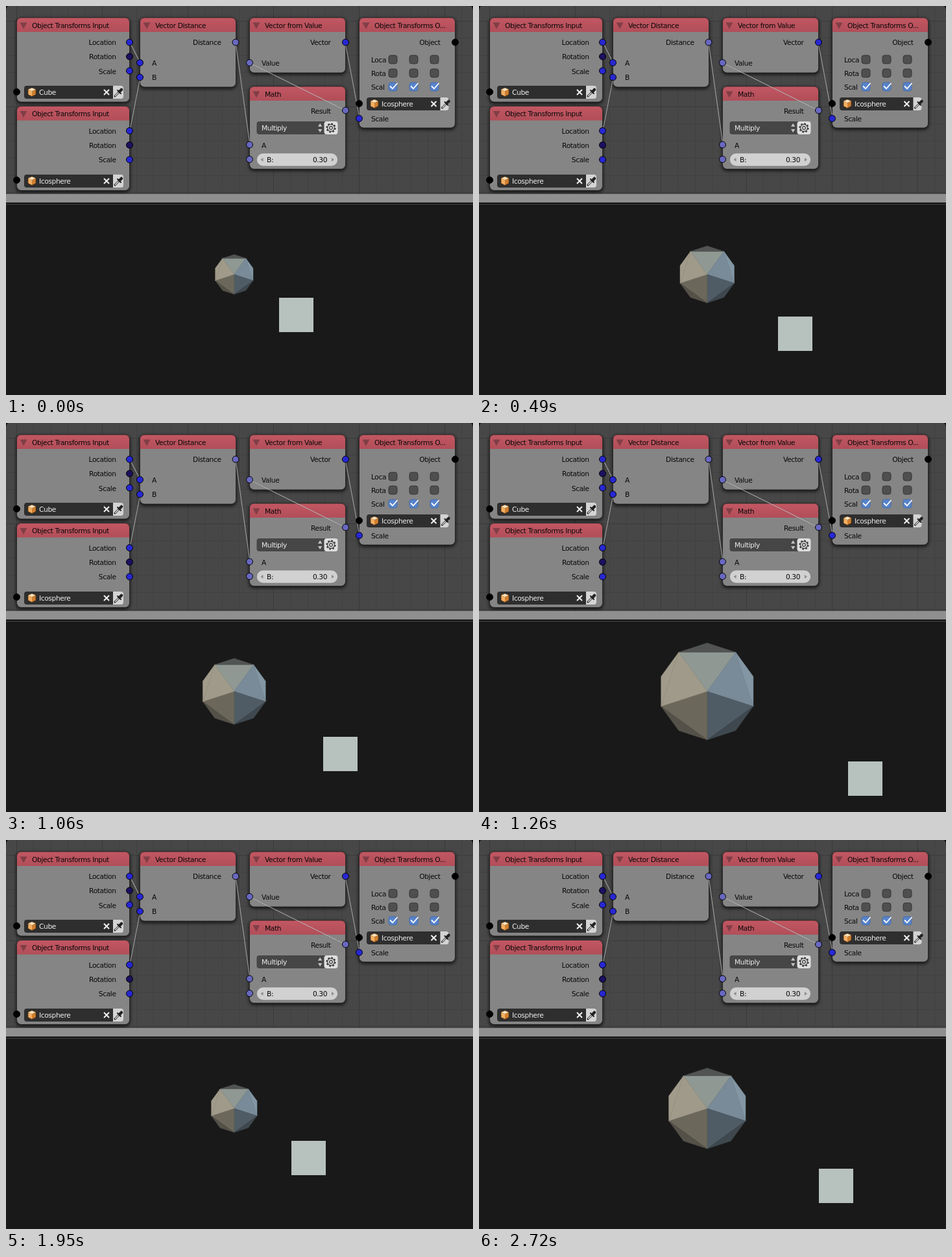
An HTML page that plays this animation: 720x600 px, repeating every 2.74 s.

```html
<!DOCTYPE html>
<html lang="en">
<head>
<meta charset="utf-8">
<title>Distance drives scale</title>
<style>
  html, body { margin: 0; width: 100%; height: 100%; overflow: hidden; background: #191919; }
  svg { display: block; width: 720px; height: 600px; }
  text { font: 10.7px "DejaVu Sans", sans-serif; letter-spacing: -.4px; fill: #080808; }
  .light { fill: #ececec; }
  .end { text-anchor: end; }
</style>
</head>
<body>
<svg viewBox="0 0 720 600">
  <defs>
    <linearGradient id="head" x2="0" y2="1">
      <stop offset="0" stop-color="#c25762"/><stop offset="1" stop-color="#b14e59"/>
    </linearGradient>
    <filter id="soft" x="-10%" y="-10%" width="120%" height="125%">
      <feGaussianBlur stdDeviation="2.6"/>
    </filter>
    <g id="box">
      <path d="M0 -6.5 L6 -4 L0 -1 L-6 -4Z" fill="#fbe3bd"/>
      <path d="M-6 -4 L0 -1 V7 L-6 4Z" fill="#f3b063"/>
      <path d="M6 -4 L0 -1 V7 L6 4Z" fill="#d07f30"/>
      <path d="M0 -6.5 L6 -4 V4 L0 7 L-6 4 V-4Z" fill="none" stroke="#5b3510" stroke-width=".7"/>
    </g>
    <g id="dropper" stroke-linecap="round">
      <path d="M-5 6 L2 -1" stroke="#222" stroke-width="3"/>
      <path d="M-4.5 5.5 L1.5 -.5" stroke="#eee" stroke-width="1.2"/>
      <path d="M-1 -3 L4 2" stroke="#222" stroke-width="2"/>
      <path d="M2 -1 L5 -4" stroke="#222" stroke-width="4.5"/>
    </g>
    <g id="gear" fill="none" stroke="#333">
      <circle r="6.6" stroke-width="2" stroke-dasharray="2.6 2.584"/>
      <circle r="5.4" stroke-width="1.1"/><circle r="2.4" stroke-width="1.1"/>
    </g>
  </defs>
  <g id="ui"></g>
  <g id="ball" stroke-width=".4" stroke-linejoin="round"></g>
  <rect id="cube" width="53" height="53" fill="#b7c1be"/>
</svg>
<script>
const $ = id => document.getElementById(id);
const rect = (x, y, w, h, fill, more = '') =>
  `<rect x="${x}" y="${y}" width="${w}" height="${h}" fill="${fill}" ${more}/>`;
const label = (x, y, s, cls = '') => `<text x="${x}" y="${Math.round(y)}" class="${cls}">${s}</text>`;
const endLabel = (x, y, s) => label(x + .6, y, s, 'end');
const path = (d, more) => `<path d="${d}" ${more}/>`;
const icon = (id, x, y) => `<use href="#${id}" x="${x}" y="${y}"/>`;

function grid() {
  let s = '';
  for (let i = 0; i < 27; i++) {
    const c = i % 5 ? '#414141' : '#3a3a3a', d = Math.round(i * 26.4);
    s += rect(16 + d, 0, 1, 290, c);
    if (i < 11) s += rect(0, 23 + d, 720, 1, c);
  }
  return s;
}

function node(x, y, w, h, title) {
  const r = 7;
  return rect(x - 1, y + 1, w + 2, h + 2, '#000', 'rx="8" opacity=".7" filter="url(#soft)"') +
    rect(x, y, w, h, '#858585', `rx="${r}"`) +
    path(`M${x} ${y + 22} V${y + r} q0 -${r} ${r} -${r} H${x + w - r} q${r} 0 ${r} ${r} V${y + 22}Z`,
      'fill="url(#head)"') +
    rect(x, y, w, h, 'none', `rx="${r}" stroke="#222" stroke-width=".8"`) +
    path(`M${x + 5} ${y + 7.5} h11 l-5.5 10Z`, 'fill="#803e46"') +
    label(x + 23.5, Math.floor(y + 16), title);
}

function picker(x, y, name, w, dropW) {
  return rect(x, y, w, 20, '#2e2e2e', 'rx="4"') +
    rect(x + w - 4, y, dropW + 4, 20, '#d4d4d4', 'rx="4"') +
    rect(x + w - 8, y, 8, 20, '#2e2e2e') +
    icon('box', x + 12, y + 9.5) + label(x + 23, y + 14, name, 'light') +
    path(`M${x + w - 14} ${y + 6} l8 8 m0 -8 l-8 8`, 'stroke="#f2f2f2" stroke-width="2"') +
    icon('dropper', x + w + 8, y + 10);
}

function check(x, y, on) {
  return rect(x - 6.5, y - 6.5, 13, 13, on ? '#5783cb' : '#4f4f4f',
    `rx="3.5" stroke="${on ? '#456aa6' : '#303030'}" stroke-width=".9"`) +
    (on ? path(`M${x - 4.5} ${y - 1} l4 4 l7.5 -8.5`, 'fill="none" stroke="#fff" stroke-width="1.8"') : '');
}

const socket = (color, ...pts) => pts.map(([x, y]) =>
  `<circle cx="${x}" cy="${y}" r="5" fill="${color}" stroke="#000"/>`).join('');

const link = (a, b, o = .65) => {
  const d = `M${a} L${b}`;
  return path(d, 'stroke="#222" stroke-width="2.4" opacity=".12"') +
    path(d, `stroke="#d0d0d0" stroke-width="1.2" opacity="${o}"`);
};

function source(y, name) {
  return node(16.5, y, 174, 130, 'Object Transforms Input') +
    ['Location', 'Rotation', 'Scale'].map((s, i) => endLabel(169, y + 42 + i * 22.3, s)).join('') +
    picker(28, Math.round(y + 105), name, 137, 16);
}

function editor() {
  let s = rect(0, 0, 720, 291, '#474747') + grid();
  s += source(18, 'Cube') + source(154.5, 'Icosphere');
  s += node(206.5, 18, 148, 107, 'Vector Distance') + endLabel(331, 60, 'Distance') +
    label(225, 92, 'A') + label(225, 114, 'B');
  s += node(375.5, 18, 148, 85, 'Vector from Value') + endLabel(500, 60, 'Vector') +
    label(394, 92, 'Value');
  s += node(375.5, 124, 148, 127.5, 'Math') + endLabel(500, 166, 'Result');
  s += rect(386.5, 178, 108, 20, '#464646', 'rx="4"') + label(394, 192, 'Multiply', 'light') +
    path('M481 186 l3.2 -5 l3.2 5Z M481 190 l3.2 5 l3.2 -5Z', 'fill="#c4c4c4"') +
    rect(490.5, 178, 21, 20, '#dedede', 'rx="4"') + icon('gear', 501, 188);
  s += label(394, 219, 'A') + rect(386.5, 227, 125, 20, '#d1d1d1', 'rx="10" stroke="#777" stroke-width=".6"') +
    path('M396.5 234 v6 l-4 -3Z M502 234 v6 l4 -3Z', 'fill="#8d8d8d"') +
    label(402, 241, 'B:') + endLabel(494.5, 241, '0.30');
  s += node(544.5, 18, 148, 170, 'Object Transforms O...') + endLabel(669, 60, 'Object');
  ['Loca', 'Rota', 'Scal'].forEach((t, i) => {
    const y = 82.5 + i * 21;
    s += label(563, y + 4.5, t);
    for (let k = 0; k < 3; k++) s += check(596.5 + k * 32, y, i == 2);
  });
  s += picker(556, 141, 'Icosphere', 113.5, 13) + label(563, 178, 'Scale');
  s += link([191, 56], [207, 88]) + link([191, 192], [207, 110]) + link([354, 56], [376, 214]) +
    link([523, 161], [376, 88]) + link([523, 56], [545, 173]);
  s += socket('#2727d2', [190.5, 56], [190.5, 100], [190.5, 192.5], [190.5, 237], [206.5, 87.5],
    [206.5, 110], [523.5, 56], [544.5, 173.5]);
  s += socket('#1b1160', [190.5, 78], [190.5, 214.5]);
  s += socket('#6868c0', [354, 56], [375.5, 87.5], [523.5, 161], [375.5, 214], [375.5, 236.5]);
  s += socket('#000', [16.5, 132.5], [16.5, 268.5], [544.5, 150.5], [692.5, 56]);
  s += path('M0 0 h4 q-4 0 -4 9Z M720 0 h-4 q4 0 4 9Z', 'fill="#000"');
  return s + rect(0, 290, 720, 13, '#8f8f8f') + rect(0, 303, 720, 3, '#1d1d1d') +
    rect(0, 306, 720, 1, '#444') + rect(0, 307, 720, 1, '#0d0d0d') + rect(0, 308, 720, 292, '#191919');
}
$('ui').innerHTML = editor();

// Icosahedron seen along a vertex: five inner faces, five rim faces.
const mid = [351.8, 414];
const inner = ['#8f9893', '#798b98', '#505c65', '#6b675b', '#a09a8a'];
const rim = ['#515453', '#8296a3', '#3e484e', '#545148', '#a19b8b'];
const faces = [...inner, ...rim].map(c => {
  const p = document.createElementNS('http://www.w3.org/2000/svg', 'polygon');
  p.setAttribute('fill', c);
  p.setAttribute('stroke', c);
  return $('ball').appendChild(p);
});

function drawBall(r) {
  const at = k => {
    const a = k * Math.PI / 5;
    return [mid[0] + r * Math.sin(a), mid[1] - r * Math.cos(a)];
  };
  for (let i = 0; i < 5; i++) {
    const a = at(2 * i - 1), b = at(2 * i + 1);
    faces[i].setAttribute('points', [mid, a, b].join(' '));
    faces[i + 5].setAttribute('points', [a, at(2 * i), b].join(' '));
  }
}

// Hand drag: time, x, y of the cube's centre
const keys = [
  [0, 447.5, 476.5], [260, 526.5, 527.5], [357, 526.5, 527.5], [489, 487.5, 505.5],
  [730, 415, 461], [845, 429.5, 468.5], [1267, 595.5, 548.5], [1390, 612.5, 555.5],
  [1490, 612.5, 555.5], [1658, 541.5, 533.5], [2000, 465, 489], [2050, 465, 489],
  [2254, 546.5, 537.5], [2500, 608.5, 557.5], [2600, 608.5, 557.5], [2720, 550.5, 533.5]
];
// Runs of picture changes: first, last, count
const runs = [[40, 260, 6], [400, 890, 12], [940, 1390, 12], [1530, 2000, 12], [2090, 2500, 11], [2640, 2720, 3]];
const LOOP = 2740;

function stepTime(t) {
  let last = 0;
  for (const [a, b, n] of runs) {
    if (t + 8 < a) break;
    const gap = (b - a) / (n - 1);
    last = a + gap * Math.min(n - 1, Math.floor((t + 8 - a) / gap));
  }
  return last;
}

const slope = (i, c) => (keys[i + 1][c] - keys[i][c]) / (keys[i + 1][0] - keys[i][0]);

// Monotone tangent, flat at turning points
function tangent(i, c) {
  if (i == 0) return slope(0, c);
  if (i == keys.length - 1) return slope(i - 1, c);
  const a = slope(i - 1, c), b = slope(i, c);
  return a * b <= 0 ? 0 : 2 * a * b / (a + b);
}

function value(t, c) {
  let i = 0;
  while (i < keys.length - 2 && t > keys[i + 1][0]) i++;
  const h = keys[i + 1][0] - keys[i][0], u = Math.min(1, (t - keys[i][0]) / h), v = 1 - u;
  return v * v * (1 + 2 * u) * keys[i][c] + u * u * (3 - 2 * u) * keys[i + 1][c] +
    h * u * v * (v * tangent(i, c) - u * tangent(i + 1, c));
}

function draw(t) {
  const s = stepTime(t), x = value(s, 1), y = value(s, 2);
  $('cube').setAttribute('x', Math.round(x - 26.5));
  $('cube').setAttribute('y', Math.round(y - 26.5));
  drawBall(.2685 * Math.hypot(x - mid[0], y - mid[1]));
}

const start = performance.now();
function tick(now) {
  draw(Math.max(0, now - start) % LOOP);
  requestAnimationFrame(tick);
}
draw(0);
requestAnimationFrame(tick);
</script>
</body>
</html>
```
